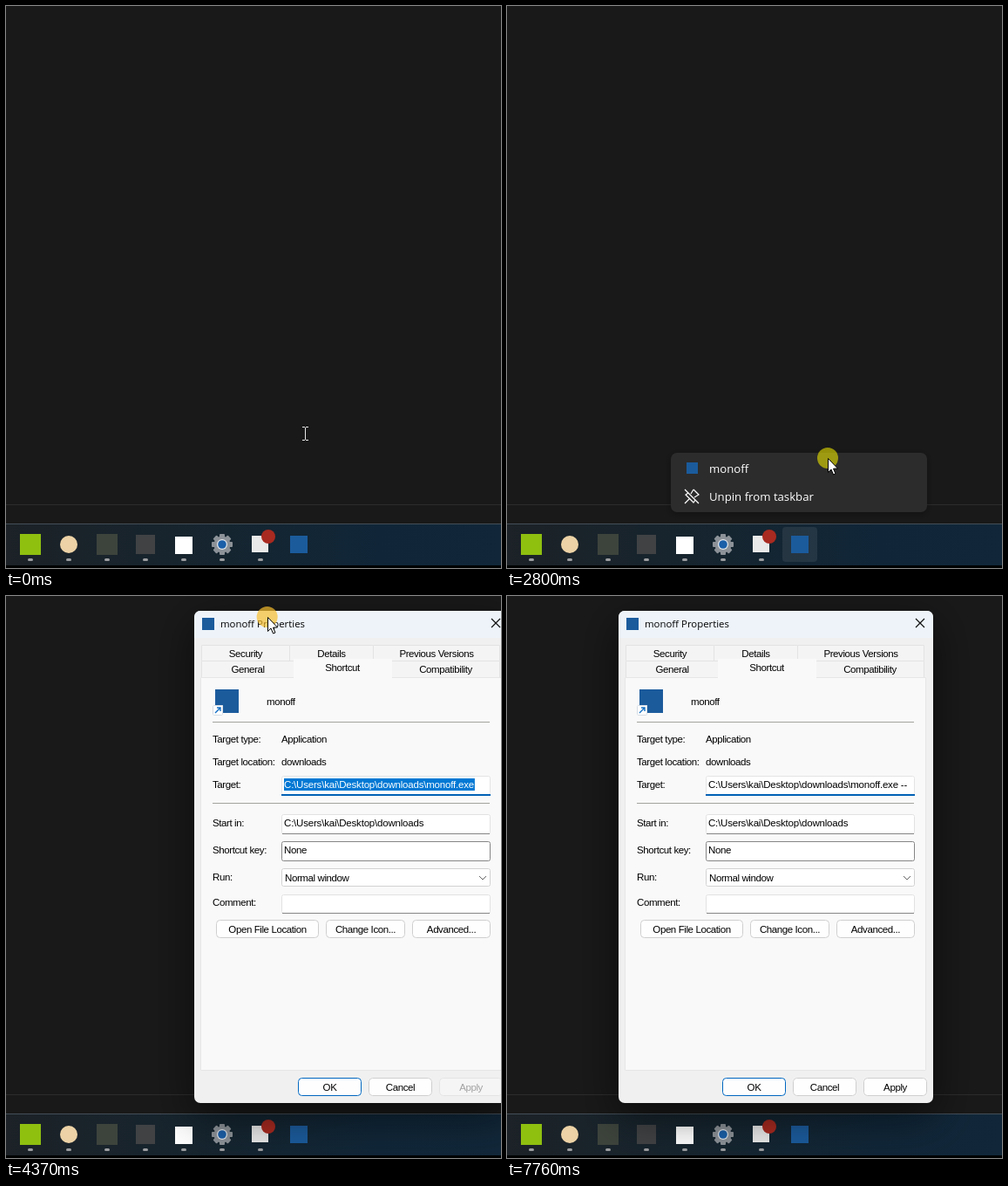
Recreate the animation shown at these times as an HTML page with a canvas. Size 568x644 px, loop 8000 ms.

```html
<!DOCTYPE html>
<html lang="en">
<head>
<meta charset="utf-8">
<title>Shortcut properties</title>
<style>
  html, body { margin: 0; width: 100%; height: 100%; overflow: hidden; background: #191919; }
  canvas { display: block; }
</style>
</head>
<body>
<canvas id="stage" width="568" height="644"></canvas>
<script>
const c = document.getElementById('stage').getContext('2d');
const LOOP = 8000;
const UI = '"Open Sans", "Noto Sans", sans-serif';
const FORM = '"Liberation Sans", Arial, sans-serif';
const BLUE = '#1b5b9c';
const FOLDER = 'C:\\Users\\kai\\Desktop\\downloads';

// Pointer stops: time, x, y, eased (1) or steady (0) on the way there
const STOPS = [
  [0, 343, 490, 0], [200, 298, 572, 0], [400, 338, 624, 0], [600, 338, 624, 0],
  [630, 337, 622, 0], [1210, 337, 622, 0], [1600, 220, 533, 1], [1960, 220, 533, 0],
  [2490, 368, 518, 1], [3480, 368, 518, 0], [3900, 435, 25, 1], [3990, 435, 25, 0],
  [4280, 338, 25, 0], [4370, 300, 24, 0], [4620, 220, 24, 0], [4750, 220, 24, 0],
  [5110, 371, 179, 1], [5540, 452, 218, 1], [6030, 452, 218, 0], [6270, 459, 223, 1],
  [LOOP, 459, 223, 0]
];
// Mouse button held: from, to, colour
const CLICKS = [
  [810, 930, 'rgba(235,228,0,.6)'], [1750, 1890, 'rgba(235,228,0,.6)'],
  [2670, 2830, 'rgba(235,228,0,.6)'], [3930, 4700, 'rgba(246,190,45,.7)'],
  [5710, 5850, 'rgba(246,190,45,.7)']
];
const KEYS = [[5710, ''], [6530, ' '], [7030, ' -'], [7230, ' --']];

const clamp = v => Math.max(0, Math.min(1, v));
const ramp = (t, a, b) => clamp((t - a) / (b - a));
const easeOut = p => 1 - (1 - p) ** 3;

function pointer(t) {
  const i = Math.max(1, STOPS.findIndex(s => s[0] > t));
  const [t0, x0, y0] = STOPS[i - 1], [t1, x1, y1, eased] = STOPS[i];
  let p = ramp(t, t0, t1);
  if (eased) p = p * p * (3 - 2 * p);
  return [x0 + (x1 - x0) * p, y0 + (y1 - y0) * p];
}

function rect(x, y, w, h, fill) {
  c.fillStyle = fill;
  c.fillRect(x, y, w, h);
}
function box(x, y, w, h, r, fill, stroke) {
  c.beginPath();
  c.roundRect(x, y, w, h, r);
  c.fillStyle = fill;
  c.fill();
  if (!stroke) return;
  c.beginPath();
  c.roundRect(x + .5, y + .5, w - 1, h - 1, r);
  c.strokeStyle = stroke;
  c.lineWidth = 1;
  c.stroke();
}
function disc(x, y, r, fill) {
  c.beginPath();
  c.arc(x, y, r, 0, 7);
  c.fillStyle = fill;
  c.fill();
}
function lines(color, width, ...paths) {
  c.beginPath();
  for (const p of paths)
    for (let i = 0; i < p.length; i += 2) c[i ? 'lineTo' : 'moveTo'](p[i], p[i + 1]);
  c.strokeStyle = color;
  c.lineWidth = width;
  c.stroke();
}
function text(s, x, y, { size = 11.5, font = FORM, gap = -.4, color = '#000', align = 'left' } = {}) {
  c.font = `${size}px ${font}`;
  c.letterSpacing = gap + 'px';
  c.textAlign = align;
  c.fillStyle = color;
  c.fillText(s, x, y);
}
const mid = (s, x, y, color) => text(s, x, y, { align: 'center', color });

function gear(x, y) {
  c.save();
  c.translate(x, y);
  for (let i = 0; i < 8; i++) {
    c.rotate(Math.PI / 4);
    box(-3, -12, 6, 7, 1, '#8c9298');
  }
  c.restore();
  disc(x, y, 9.5, '#8c9298');
  disc(x, y, 6, '#e4e8ec');
  disc(x, y, 4.8, '#1a5fa8');
}

function desktop(t) {
  rect(0, 0, 568, 644, '#191919');
  rect(0, 571, 568, 1, '#2c2c2c');
}
function taskbar(t) {
  const g = c.createLinearGradient(0, 0, 568, 0);
  g.addColorStop(0, '#1c2227');
  g.addColorStop(.45, '#152530');
  g.addColorStop(.75, '#102638');
  g.addColorStop(1, '#112739');
  rect(0, 593, 568, 48, g);
  rect(0, 593, 568, 1, '#434e58');
  rect(0, 641, 568, 3, '#000');
  const hover = ramp(t, 300, 390) * (1 - ramp(t, 2850, 2980));
  box(316, 597, 40, 40, 4, `rgba(255,255,255,${.075 * hover})`);
  rect(16, 605, 24, 24, '#8fc010');
  disc(72, 617, 10, '#ecd2a6');
  rect(104, 605, 24, 24, '#3d443c');
  rect(149, 606, 22, 22, '#404244');
  rect(194, 608, 20, 20, '#fff');
  gear(248, 617);
  rect(282, 607, 19, 19, '#e9e9e9');
  disc(301, 608, 8, '#a92a20');
  rect(326, 607, 20, 20, BLUE);
  for (let x = 28; x < 300; x += 44) box(x - 3, 633, 6, 3, 1.5, '#9b9da0');
}

const menuText = { size: 13.2, font: UI, gap: 0, color: '#fff' };

function panel(x, y, w, h) {
  c.save();
  c.shadowColor = 'rgba(0,0,0,.3)';
  c.shadowBlur = 8;
  c.shadowOffsetY = 2;
  box(x, y, w, h, 7, '#2c2c2c');
  c.restore();
}
function jumpList(t, y) {
  const shown = easeOut(ramp(t, 930, 1130));
  const alpha = Math.min(shown, 1 - ramp(t, 2840, 2930));
  if (alpha <= 0) return;
  c.save();
  c.beginPath();
  c.rect(0, 0, 568, 593);
  c.clip();
  c.globalAlpha = alpha;
  c.translate(0, 40 * (1 - shown));
  panel(188, 512, 294, 68);
  if (t > 1210 && t < 2670 && y < 578)
    box(192, y < 546 ? 515 : 547, 286, 30, 4, 'rgba(255,255,255,.06)');
  rect(206, 523, 13, 13, BLUE);
  text('monoff', 232, 535, menuText);
  // crossed-out pin
  lines('#fff', 1.2, [204, 554, 220, 570], [204, 570, 209, 565], [214, 554, 220, 560, 215, 563],
    [214, 554, 211, 559], [208, 558, 205, 560, 214, 569, 216, 566]);
  text('Unpin from taskbar', 232, 567, menuText);
  c.restore();
}
function itemMenu(t, [x, y]) {
  const shown = easeOut(ramp(t, 1830, 2000));
  if (!shown || t >= 2760) return;
  c.save();
  c.globalAlpha = shown * (1 - ramp(t, 2690, 2760));
  c.beginPath();
  c.rect(208, 360, 310, 175);
  c.clip();
  c.translate(0, 24 * (1 - shown));
  panel(220, 366, 294, 167);
  if (t > 2050 && y < 531) box(224, 500, 286, 30, 4, 'rgba(255,255,255,.07)');
  ['Open', 'Run as administrator', 'Open file location', 'Pin to Start', 'Properties']
    .forEach((s, i) => text(s, 264, 392 + 32 * i, menuText));
  c.restore();
}

function tab(s, x, y, w, h) {
  box(x, y, w, h, 0, '#f4f4f4', '#e3e3e3');
  mid(s, x + w / 2, y + 14);
}
function button(s, x, y, w, border = '#cfcfcf', fill = '#fefefe', color = '#000') {
  box(x, y, w, 21, 4, fill, border);
  mid(s, x + w / 2, y + 15, color);
}
function field(y, h, border, base) {
  box(100, y, 240, h, 2, '#fff', border);
  if (base) rect(101, y + h - 1, 238, 1, base);
}

// Drawn in its own coordinates: x from the window's left edge
function dialog(t) {
  const shown = easeOut(ramp(t, 2950, 3130));
  if (!shown) return;
  const left = t < 3950 ? 343 : t > 4660 ? 128 : pointer(t - 20)[0] - 92;
  c.save();
  c.globalAlpha = shown;
  c.translate(left + 180, 299);
  c.scale(.9 + .1 * shown, .9 + .1 * shown);
  c.translate(-180, -299);

  c.save();
  c.shadowColor = 'rgba(0,0,0,.55)';
  c.shadowBlur = 50;
  c.shadowOffsetY = 14;
  box(0, 17, 361, 564, 7, '#f0f0f0');
  c.restore();
  box(0, 17, 361, 31, [7, 7, 0, 0], '#edf3f9');
  rect(9, 25, 14, 14, BLUE);
  text('monoff Properties', 30, 36, { size: 11.4, font: UI, gap: 0 });
  lines('#111', 1.2, [341, 26, 351, 36], [351, 26, 341, 36]);

  tab('Security', 8, 56, 102, 20);
  tab('Details', 109, 56, 97, 20);
  tab('Previous Versions', 205, 56, 146, 20);
  tab('General', 8, 74, 107, 20);
  tab('Compatibility', 226, 74, 125, 20);
  box(7, 93, 346, 451, 0, '#f9f9f9', '#e6e6e6');
  rect(114, 72, 113, 23, '#f9f9f9');
  mid('Shortcut', 170, 86);

  rect(24, 107, 27, 27, BLUE);
  box(21, 125, 12, 12, 1, '#fff', '#d5dce4');
  lines('#1670c4', 1.4, [24, 134, 30, 128], [26, 128, 30, 128, 30, 132]);
  text('monoff', 83, 125);
  rect(21, 144, 318, 1, '#a3a39e');
  rect(21, 237, 318, 1, '#a3a39e');
  [['Target type:', 168], ['Target location:', 194], ['Target:', 220], ['Start in:', 264],
    ['Shortcut key:', 295], ['Run:', 326], ['Comment:', 355]].forEach(([s, y]) => text(s, 21, y));
  text('Application', 100, 168);
  text('downloads', 100, 194);

  field(206, 22, '#e4e4e4');
  rect(100, 227, 240, 2, '#0061b5');
  target(t);
  field(250, 23, '#e2e2e2', '#868686');
  text(FOLDER, 103, 264, { gap: -.2 });
  field(281, 23, '#858585');
  text('None', 103, 295);
  field(312, 21, '#d2d2d2');
  text('Normal window', 104, 327);
  lines('#666', 1, [327, 321, 331, 325, 335, 321]);
  field(342, 22, '#e2e2e2', '#868686');

  button('Open File Location', 25, 371, 118);
  button('Change Icon...', 151, 371, 91);
  button('Advanced...', 250, 371, 90);
  button('OK', 119, 552, 73, '#0067c0');
  button('Cancel', 200, 552, 73);
  button('Apply', 281, 552, 73, '#e4e4e4', '#f5f5f5', '#a2a2a2');
  const enabled = ramp(t, 6530, 6740);
  if (enabled) {
    c.globalAlpha = enabled;
    button('Apply', 281, 552, 73);
  }
  c.restore();
}

function target(t) {
  const [since, typed] = KEYS.findLast(k => k[0] <= t) || [0, ''];
  const path = FOLDER + '\\monoff.exe' + typed;
  c.font = `11.5px ${FORM}`;
  c.letterSpacing = '-0.2px';
  const end = 103 + c.measureText(path).width;
  if (!since) rect(103, 209, end - 102, 14, '#0078d4');
  text(path, 103, 220, { gap: -.2, color: since ? '#000' : '#fff' });
  if (since && (t - since) % 1060 < 530) rect(Math.round(end), 209, 1, 13, '#000');
}

function drawPointer(t, [x, y]) {
  for (const [from, to, color] of CLICKS)
    if (t >= from && t < to) disc(x, y, 12, color);
  if (t >= 6530) return;
  const inField = t > 5140 && y > 206;
  x = Math.round(x);
  y = Math.round(y);
  if (inField || (t < 300 && y < 572)) {
    const ink = inField ? '#000' : '#e8e8e8';
    rect(x, y - 7, 1, 14, ink);
    for (const dy of [-8, 7]) {
      rect(x - 3, y + dy, 3, 1, ink);
      rect(x + 1, y + dy, 3, 1, ink);
    }
    return;
  }
  c.save();
  c.translate(x, y);
  c.beginPath();
  [[.5, .5], [.5, 16.5], [4, 13], [6.6, 19], [9, 18], [6.5, 12.2], [11.5, 12]]
    .forEach(p => c.lineTo(...p));
  c.closePath();
  c.fillStyle = '#fff';
  c.fill();
  c.strokeStyle = '#000';
  c.lineWidth = 1;
  c.stroke();
  c.restore();
}

function draw(t) {
  const at = pointer(t);
  desktop();
  jumpList(t, at[1]);
  taskbar(t);
  itemMenu(t, at);
  dialog(t);
  drawPointer(t, at);
}

const start = performance.now();
function tick() {
  draw((performance.now() - start) % LOOP);
  requestAnimationFrame(tick);
}
tick();
</script>
</body>
</html>
```
